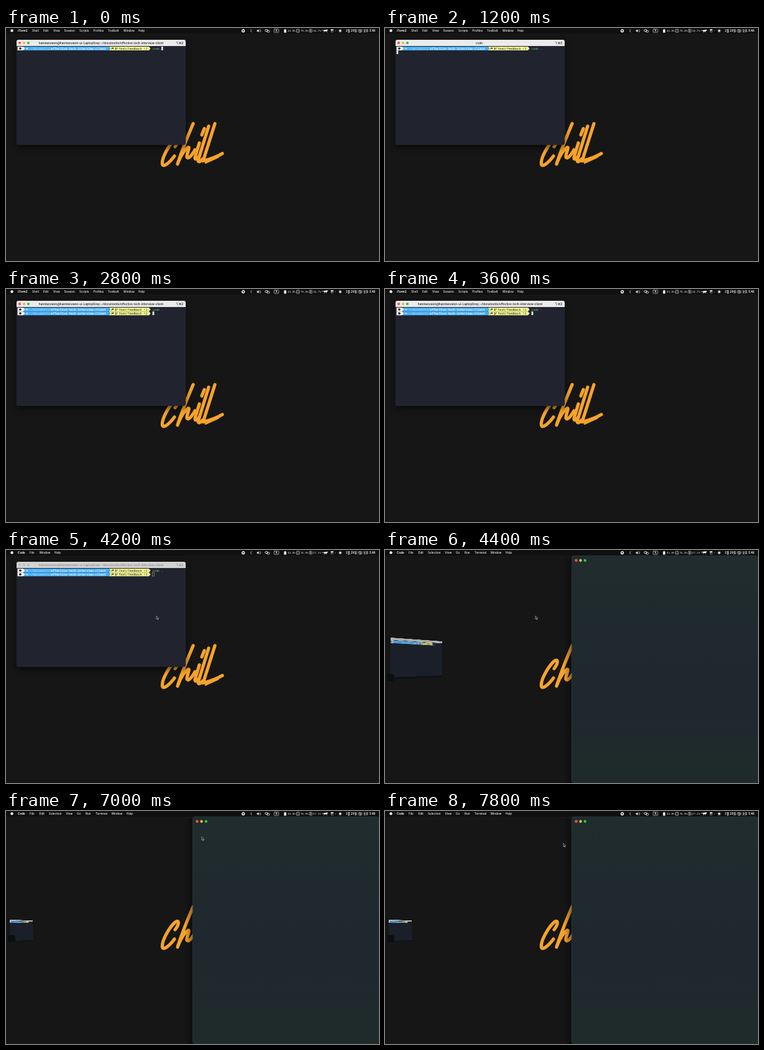
An HTML page that plays this animation: 600 by 375 pixels, repeating every 8000 ms.

```html
<!DOCTYPE html>
<html lang="ko">
<head>
<meta charset="utf-8">
<style>
html, body { margin: 0; width: 100%; height: 100%; overflow: hidden; background: #161616; }
#stage { position: relative; width: 600px; height: 375px; overflow: hidden; }
svg { position: absolute; left: 0; top: 0; }
#term { transform-origin: 0 0; border-radius: 3px; box-shadow: 0 4px 10px #0009, 0 0 1px #777; }
text { white-space: pre; }
.ui { font: 500 4.6px Inter, sans-serif; fill: #f2f2f2; }
.bold { font-weight: 700; }
.mono { font: 4.75px "DejaVu Sans Mono", monospace; }
.stat { font: 4.3px "DejaVu Sans Mono", monospace; fill: #dcdcdc; }
.date { font: 700 4.6px "Noto Sans CJK KR", "Noto Sans CJK", sans-serif; fill: #f2f2f2; }
.title { font: 600 4.65px Inter, sans-serif; text-anchor: middle; }
.keys { font: bold 4.6px Inter, "DejaVu Sans", sans-serif; }
.line { fill: none; stroke: #eee; stroke-width: .8; stroke-linecap: round; stroke-linejoin: round; }
</style>
</head>
<body>
<div id="stage">
  <svg width="600" height="375">
    <rect width="600" height="375" fill="#161616"/>
    <rect width="600" height="9" fill="#101010"/>
    <!-- wallpaper lettering -->
    <g fill="none" stroke="#f6a32b" stroke-width="5.2" stroke-linecap="round" stroke-linejoin="round">
      <path d="M272 191C279 182 279 174 272 179C263 187 250 209 251.5 219C253 225 263 217 271 206"/>
      <path d="M301 154C293 173 283 196 276 219"/>
      <path d="M277 216C282 204 288 195 293 192C297 191 290 203 291 208C294 212 300 203 304 196"/>
      <path d="M311 185L304 208C303 213 308 211 311 206M315 172L319 162"/>
      <path d="M326 158L309 213C309 217 313 215 316 211"/>
      <path d="M336 154L317 214C325 212 338 208 348 202"/>
      <path d="M321 217L341 208" stroke-width="3"/>
    </g>
  </svg>

  <svg id="term" width="272" height="169" viewBox="17 19 272 169">
    <rect id="pane" x="17" y="19" width="272" height="169"/>
    <rect id="bar" x="17" y="19" width="272" height="10"/>
    <g id="lights"></g>
    <text id="title" class="title" x="153" y="25.7"></text>
    <text id="keys" class="keys" x="273" y="25.7">⌥⌘2</text>
    <g id="prompt">
      <path d="M29 30h136l3 3-3 3H29z" fill="#47aef5"/>
      <path d="M18.5 30H28l2.3 3L28 36h-9.5z" fill="#f4f4f4"/>
      <circle cx="23" cy="33" r="1.8" fill="#111"/>
      <path d="M32 32.2h3.4v1.8H32z" fill="#c4e6ff"/>
      <path d="M165.5 30H230l2.7 3-2.7 3h-64.5l2.5-3z" fill="#f2f595"/>
      <path d="M169.6 34.6l1-2 1 1 1.3-2M170 32h2.8v1.6" fill="none" stroke="#222" stroke-width=".8"/>
      <path d="M176.3 31v4.2M176.3 33.8c2.6 0 2.6-.8 2.6-2.6" fill="none" stroke="#222" stroke-width=".8"/>
      <text class="mono" y="34.7"><tspan x="38" fill="#b5dcf8">~/documents/</tspan><tspan fill="#f2faff" font-weight="bold">effective-tech-interview-client</tspan><tspan x="181.5" fill="#20220f">feat/feedback !1</tspan></text>
    </g>
    <use id="prompt2" href="#prompt" y="6.3"/>
    <text class="mono" x="235.5" y="34.7" fill="#69c06a">code <tspan id="dot" fill="#c8d8c8">.</tspan></text>
    <rect id="caret" width="2.8" height="5.8"/>
  </svg>

  <svg width="600" height="375">
    <defs>
      <linearGradient id="glass" x2="0" y2="1">
        <stop offset="0" stop-color="#202c2d"/>
        <stop offset=".25" stop-color="#1f2a2d"/>
        <stop offset=".5" stop-color="#1f282f"/>
        <stop offset=".7" stop-color="#1f282f"/>
        <stop offset=".85" stop-color="#1f2a2b"/>
        <stop offset="1" stop-color="#1f2a2b"/>
      </linearGradient>
      <linearGradient id="shade">
        <stop offset="0" stop-opacity="0"/>
        <stop offset="1" stop-opacity=".35"/>
      </linearGradient>
    </defs>
    <g id="editor">
      <rect x="3.6" y="199.8" width="11.2" height="11.2" rx="2" fill="#0b0f10"/>
      <rect x="288" y="12" width="12" height="363" fill="url(#shade)"/>
      <rect x="300.3" y="9.3" width="299.4" height="365.4" rx="4" fill="url(#glass)" stroke="#304345" stroke-width=".6"/>
      <circle cx="307.5" cy="16.7" r="2.2" fill="#fb554d"/>
      <circle cx="314.6" cy="16.7" r="2.2" fill="#fcbb3c"/>
      <circle cx="321.8" cy="16.7" r="2.2" fill="#2bc840"/>
    </g>

    <circle cx="9.5" cy="4.3" r="2.2" fill="#f2f2f2"/>
    <g id="menu" class="ui"></g>

    <circle cx="381.6" cy="4.5" r="1.9" fill="none" stroke="#f4f4f4" stroke-width="1.5"/>
    <g class="line">
      <path d="M395 2.5l-1.5 2 1.5 2"/>
      <path d="M408 3q1 1.5 0 3M409.3 2.4q1.4 2.1 0 4.2" stroke-width=".5"/>
      <rect x="416.7" y="2.5" width="4.6" height="3" rx="1.5"/>
      <rect x="419.5" y="3.8" width="4.6" height="3" rx="1.5"/>
      <rect x="431.2" y="1.8" width="7.6" height="5.4" rx="1" stroke-width=".6"/>
      <path d="M468.8 2h-1v5h1M470.4 2h1v5h-1"/>
      <rect x="488" y="2.2" width="4.4" height="4.6" rx="1" stroke-width=".6"/>
      <rect x="522.6" y="5" width="4" height="1.6" rx=".8" stroke-width=".4"/>
      <path d="M537.6 2v5M535.1 4.5h5M535.8 2.7l3.6 3.6M539.4 2.7l-3.6 3.6" stroke-width=".6"/>
    </g>
    <path d="M403.6 3.6h1.2l1.7-1.5v4.8l-1.7-1.5h-1.2zM447.2 2.5h1v-.7h1.6v.7h1v5h-3.6z" fill="#eee"/>
    <rect x="489.4" y="3.7" width="1.6" height="1.6" fill="#eee"/>
    <circle cx="537.6" cy="4.5" r="1.4" fill="#eee"/>
    <rect x="522.4" y="2" width="4.4" height="2" rx="1" fill="#eee"/>
    <circle cx="529.8" cy="4.5" r=".7" fill="#e8493f"/>
    <text class="ui" x="433.4" y="6.1">A</text>
    <text id="stats" class="stat" y="6.2"></text>
    <path id="cat" class="line"/>
    <ellipse id="body" cx="513.8" rx="2.6" ry="1.4" fill="#f4f4f4"/>
    <circle id="head" cx="516.3" r="1.2" fill="#f4f4f4"/>
    <text class="date" x="546.5" y="6.2">1월 29일 (월) 오후 5:48</text>

    <path id="mouse" d="M0 0v5.2l1.2-1.1.9 2 .9-.4-.9-1.9h1.6z" fill="#080808" stroke="#d8d8d8" stroke-width=".6"/>
  </svg>
</div>
<script>
const LOOP = 8000, STEP = 200;
const TYPED = 400, RUN = 1000, DONE = 1800, LAUNCH = 4000, OPEN = 4400;
const $ = id => document.getElementById(id);
const set = (id, attrs) => {
  for (const [key, value] of Object.entries(attrs)) $(id).setAttribute(key, value);
};
const show = (id, on) => set(id, { visibility: on ? 'visible' : 'hidden' });

const shellTitle = 'hanmaruwon@hanmaruwon-ui-LaptopGray:~/documents/effective-tech-interview-client';
const menus = {
  shell: [[19, 'iTerm2'], [42, 'Shell'], [60, 'Edit'], [76, 'View'], [93.5, 'Session'], [118, 'Scripts'],
    [140.5, 'Profiles'], [164, 'Toolbelt'], [189, 'Window'], [213, 'Help']],
  launching: [[19, 'Code'], [38, 'File'], [53.5, 'Window'], [78, 'Help']],
  code: [[19, 'Code'], [38, 'File'], [53.5, 'Edit'], [69, 'Selection'], [96.5, 'View'], [114, 'Go'],
    [128, 'Run'], [144, 'Terminal'], [169.5, 'Window'], [194, 'Help']]
};

// Window corners: top left, top right, bottom right, bottom left.
const shrink = [
  [4200, [17, 19, 289, 19, 289, 188, 17, 188]],
  [4400, [9, 141, 92, 147, 92, 202, 8, 205]],
  [4600, [6.5, 169, 51, 171, 51, 208, 6, 209]],
  [4800, [6, 175, 43, 176, 44, 208, 6, 209]]
];
const mousePath = [[4800, [242, 106]], [6000, [366.5, 22.5]], [6400, [366.5, 22.5]], [7400, [287, 52]]];
const ease = u => u * u * (3 - 2 * u);

function sample(track, t) {
  const next = track.findIndex(([time]) => time > t);
  if (next === 0) return track[0][1];
  if (next < 0) return track[track.length - 1][1];
  const [t0, from] = track[next - 1], [t1, to] = track[next];
  const u = ease((t - t0) / (t1 - t0));
  return from.map((v, i) => v + (to[i] - v) * u);
}

// Projective transform that maps a w by h box onto a quad.
function project([x0, y0, x1, y1, x2, y2, x3, y3], w, h) {
  const ax = x1 - x2, bx = x3 - x2, sx = x0 - x1 + x2 - x3;
  const ay = y1 - y2, by = y3 - y2, sy = y0 - y1 + y2 - y3;
  const det = ax * by - bx * ay;
  const g = (sx * by - bx * sy) / det, k = (ax * sy - sx * ay) / det;
  return `matrix3d(${[
    (x1 - x0 + g * x1) / w, (y1 - y0 + g * y1) / w, 0, g / w,
    (x3 - x0 + k * x3) / h, (y3 - y0 + k * y3) / h, 0, k / h,
    0, 0, 1, 0, x0, y0, 0, 1].map(v => v.toFixed(7))})`;
}

function drawMenu(items) {
  $('menu').innerHTML = items.map(([x, label], i) =>
    `<text x="${x}" y="6"${i ? '' : ' class="bold"'}>${label}</text>`).join('');
}

function drawCat(step) {
  const phase = step * 3 % 5 / 5 * Math.PI * 2;
  const reach = .8 + .6 * Math.cos(phase), y = 4.1 - .4 * Math.sin(phase);
  set('body', { cy: y });
  set('head', { cy: y - .6 });
  set('cat', { d: `M511.8 ${y}l-3-.4M512.6 ${y + .5}l${-reach} 2M515 ${y + .5}l${reach} 1.9` });
}

function drawTerminal(t) {
  const active = t < LAUNCH, running = t >= RUN && t < DONE;
  set('pane', { fill: t < OPEN ? '#21242f' : '#19202b' });
  set('bar', { fill: active ? '#ebebeb' : '#d2d2d2' });
  const colors = active ? ['#fb4f48', '#fcb32e', '#2dbd44'] : ['#bcbcbc', '#bcbcbc', '#bcbcbc'];
  $('lights').innerHTML = colors.map((c, i) =>
    `<circle cx="${22 + 7 * i}" cy="24" r="2.1" fill="${c}"/>`).join('');
  $('title').textContent = running ? 'code .' : shellTitle;
  for (const id of ['title', 'keys']) set(id, { fill: active ? '#333' : '#929292' });
  show('dot', t >= TYPED);
  show('prompt2', t >= DONE);
  const [x, y] = t < TYPED ? [249.8, 30] : t < RUN ? [252.7, 30] : running ? [18.5, 36.2] : [235.6, 36.2];
  set('caret', { x, y, fill: active ? '#e8e8e8' : 'none', stroke: active ? 'none' : '#bbb', 'stroke-width': .5 });
  $('term').style.transform = project(sample(shrink, t), 272, 169);
  $('term').style.opacity = t < OPEN ? 1 : .85;
}

function draw(step) {
  const t = step * STEP;
  drawMenu(t < LAUNCH ? menus.shell : t < OPEN ? menus.launching : menus.code);
  drawTerminal(t);
  drawCat(step);
  const stats = t < LAUNCH ? ['43.0%', '79.8%', '16.7%'] : ['43.0%', '76.8%', '27.1%'];
  $('stats').innerHTML = stats.map((s, i) => `<tspan x="${453 + 20.4 * i}">${s}</tspan>`).join('');
  show('editor', t >= OPEN);
  show('mouse', t >= LAUNCH);
  set('mouse', { transform: `translate(${sample(mousePath, t)})` });
}

const start = performance.now();
let last = -1;
function tick() {
  const step = Math.floor((performance.now() - start) % LOOP / STEP);
  if (step !== last) draw(last = step);
  requestAnimationFrame(tick);
}
tick();
</script>
</body>
</html>
```
